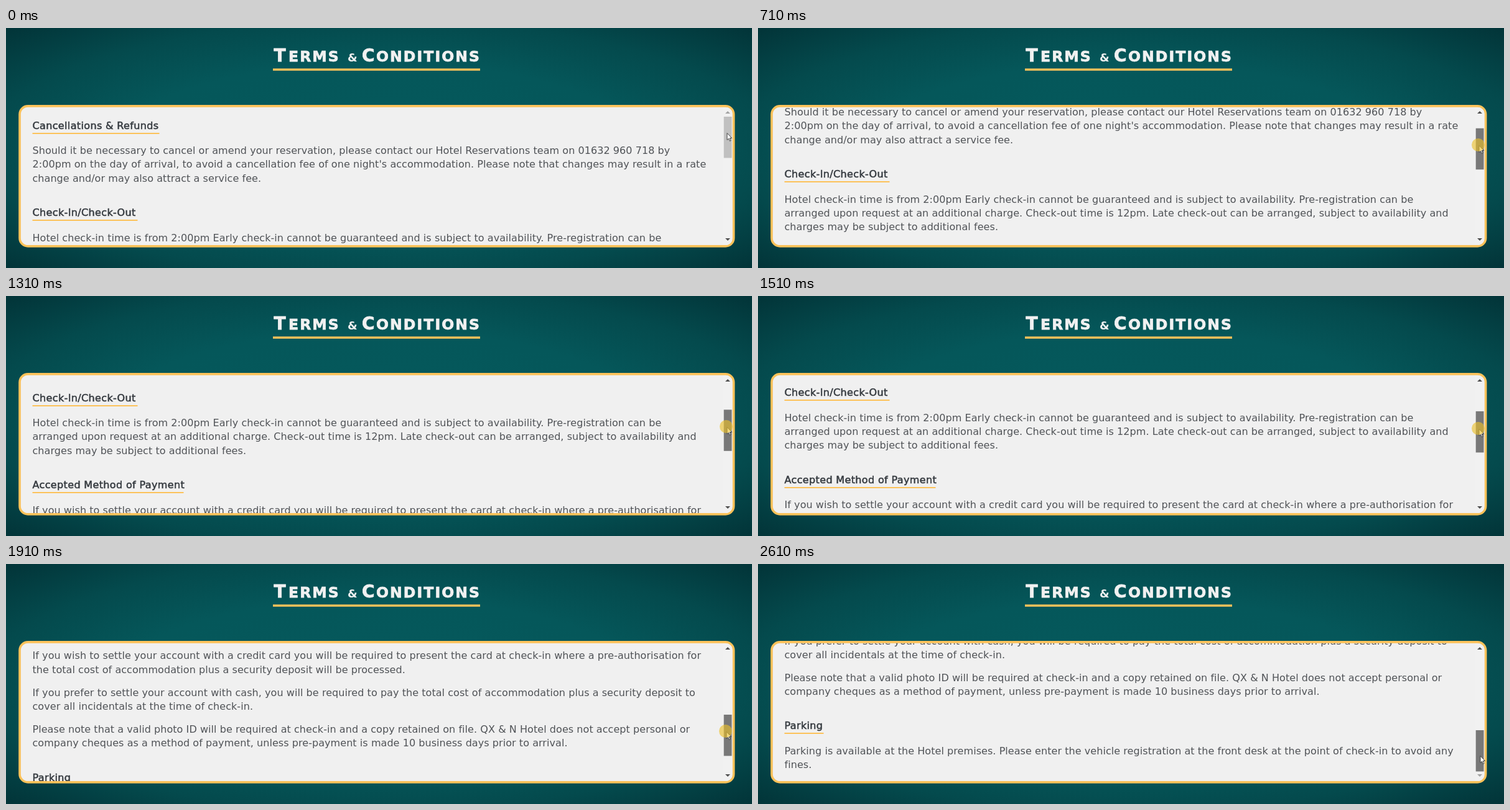
Write an HTML page with a canvas that moves like this. It is 1199 px wide and 387 px high and loops after 2810 ms.

```html
<!DOCTYPE html>
<html lang="en">
<head>
<meta charset="utf-8">
<title>Terms &amp; Conditions</title>
<style>
  html, body { margin: 0; width: 100%; height: 100%; overflow: hidden; background: #033f42; }
  canvas { display: block; }
</style>
</head>
<body>
<canvas id="stage" width="1199" height="387"></canvas>
<script>
const ctx = document.getElementById('stage').getContext('2d');
const W = 1199, H = 387, LOOP = 2810;
const FONT = '"DejaVu Sans", sans-serif';
const GOLD = '#fcc25a', PAPER = '#f0f0f0', WHITE = '#f1f1f1', INK = '#363b40';
const MAX_SCROLL = 414, THUMB = { top: 143, height: 66.5, travel: 125 };

// Start time, scroll offset, pointer x, pointer y, button held
const STEPS = [
  [0, 0, 1159, 169, false],
  [100, 0, 1160, 169, false],
  [400, 26, 1159, 178, true],
  [510, 52, 1159, 186, true],
  [710, 62, 1159, 189, true],
  [1000, 89, 1159, 197, true],
  [1120, 111, 1159, 204, true],
  [1310, 133.6, 1159, 211, true],
  [1510, 142, 1159, 214, true],
  [1710, 306, 1157, 262, true],
  [1910, 331, 1158, 270, true],
  [2110, 355, 1160, 278, true],
  [2300, 372, 1160, 284, true],
  [2510, MAX_SCROLL, 1161, 302, true],
  [2610, MAX_SCROLL, 1161, 309, false]
];

const SECTIONS = [
  { title: 'Cancellations & Refunds', rule: 204, paragraphs: [[
    'Should it be necessary to cancel or amend your reservation, please contact our Hotel Reservations team on 01632 960 718 by',
    '2:00pm on the day of arrival, to avoid a cancellation fee of one night\'s accommodation. Please note that changes may result in a rate',
    'change and/or may also attract a service fee.'
  ]] },
  { title: 'Check-In/Check-Out', rule: 169, paragraphs: [[
    'Hotel check-in time is from 2:00pm Early check-in cannot be guaranteed and is subject to availability. Pre-registration can be',
    'arranged upon request at an additional charge. Check-out time is 12pm. Late check-out can be arranged, subject to availability and',
    'charges may be subject to additional fees.'
  ]] },
  { title: 'Accepted Method of Payment', rule: 243, paragraphs: [[
    'If you wish to settle your account with a credit card you will be required to present the card at check-in where a pre-authorisation for',
    'the total cost of accommodation plus a security deposit will be processed.'
  ], [
    'If you prefer to settle your account with cash, you will be required to pay the total cost of accommodation plus a security deposit to',
    'cover all incidentals at the time of check-in.'
  ], [
    'Please note that a valid photo ID will be required at check-in and a copy retained on file. QX & N Hotel does not accept personal or',
    'company cheques as a method of payment, unless pre-payment is made 10 business days prior to arrival.'
  ]] },
  { title: 'Parking', rule: 63, paragraphs: [[
    'Parking is available at the Hotel premises. Please enter the vehicle registration at the front desk at the point of check-in to avoid any',
    'fines.'
  ]] }
];

function rect(x, y, w, h, color) {
  ctx.fillStyle = color;
  ctx.fillRect(x, y, w, h);
}

function polygon(points) {
  ctx.beginPath();
  points.forEach(([x, y]) => ctx.lineTo(x, y));
  ctx.closePath();
}

function text(str, x, y, { size = 16, color = INK, spacing = 0, weight = 400, outline = 0 }) {
  ctx.font = `${weight} ${size}px ${FONT}`;
  ctx.letterSpacing = spacing + 'px';
  ctx.fillStyle = ctx.strokeStyle = color;
  ctx.fillText(str, x, y);
  if (outline) {
    ctx.lineWidth = outline;
    ctx.strokeText(str, x, y);
  }
}

function drawBackground() {
  ctx.save();
  ctx.translate(W / 2, H / 2);
  ctx.scale(W / 2 * Math.SQRT2, H / 2 * Math.SQRT2);
  const glow = ctx.createRadialGradient(0, 0, 0, 0, 0, 1);
  glow.addColorStop(0, '#05595c');
  glow.addColorStop(0.5, '#05575a');
  glow.addColorStop(0.75, '#044a4d');
  glow.addColorStop(1, '#023438');
  rect(-1, -1, 2, 2, glow);
  ctx.restore();
}

function drawTitle() {
  const style = { color: WHITE, weight: 700, outline: 0.8 };
  const large = { ...style, size: 28 };
  const small = { ...style, size: 23.5, spacing: 2.1 };
  text('T', 430.5, 53.5, large);
  text('ERMS', 454, 53.5, small);
  text('&', 549, 53.5, { ...style, size: 18, outline: 0 });
  text('C', 572, 53.5, large);
  text('ONDITIONS', 595, 53.5, small);
  rect(429, 65.3, 333, 3.5, GOLD);
}

function drawHeading({ title, rule }, y) {
  text(title, 42.5, y, { spacing: 0.36, outline: 0.55 });
  rect(42.5, y + 6, rule, 2, GOLD);
}

function drawContent(scroll) {
  const body = { color: '#505357', spacing: 0.06 };
  let y = 162.5 - scroll;
  for (const section of SECTIONS) {
    drawHeading(section, Math.round(y));
    y += 40.7;
    section.paragraphs.forEach((lines, p) => {
      if (p) y += 37;
      lines.forEach((line, i) => {
        if (i) y += 22.2;
        text(line, 42.5, Math.round(y), body);
      });
    });
    y += 55.5;
  }
}

function drawArrow(base, tip, enabled) {
  polygon([[1156, base], [1164, base], [1160, tip]]);
  ctx.fillStyle = enabled ? '#505050' : '#a3a3a3';
  ctx.fill();
}

function drawScrollbar(scroll) {
  rect(1153, 128, 14, 222, '#f1f1f1');
  drawArrow(138, 134, scroll > 0);
  drawArrow(339, 343, scroll < MAX_SCROLL);
  const y = THUMB.top + scroll / MAX_SCROLL * THUMB.travel;
  rect(1153.7, y, 12.8, THUMB.height, scroll > 0 ? '#787878' : '#c0c0c0');
}

function drawPanel(scroll) {
  ctx.beginPath();
  ctx.roundRect(20.2, 124.1, 1151.2, 229.6, 15);
  ctx.fillStyle = GOLD;
  ctx.fill();
  ctx.save();
  ctx.beginPath();
  ctx.roundRect(23.8, 127.7, 1144, 222.4, 11.4);
  ctx.fillStyle = PAPER;
  ctx.fill();
  ctx.clip();
  drawContent(scroll);
  drawScrollbar(scroll);
  ctx.restore();
}

function drawPointer(x, y, held) {
  ctx.save();
  ctx.translate(x, y);
  polygon([[0, 0.5], [0, 11.5], [2.5, 9.2], [4.3, 13.3], [6, 12.5], [4.3, 8.5], [7.6, 8.5]]);
  ctx.fillStyle = '#fff';
  ctx.fill();
  ctx.strokeStyle = '#333';
  ctx.lineWidth = 0.9;
  ctx.stroke();
  if (held) {
    ctx.beginPath();
    ctx.arc(-1.5, -0.5, 10.5, 0, Math.PI * 2);
    ctx.fillStyle = 'rgba(235, 192, 40, 0.62)';
    ctx.fill();
  }
  ctx.restore();
}

function render(now) {
  const time = now % LOOP;
  const [, scroll, x, y, held] = STEPS.findLast(step => step[0] <= time);
  drawBackground();
  drawTitle();
  drawPanel(scroll);
  drawPointer(x, y, held);
}

const start = performance.now();
function tick() {
  render(performance.now() - start);
  requestAnimationFrame(tick);
}
tick();
</script>
</body>
</html>
```
